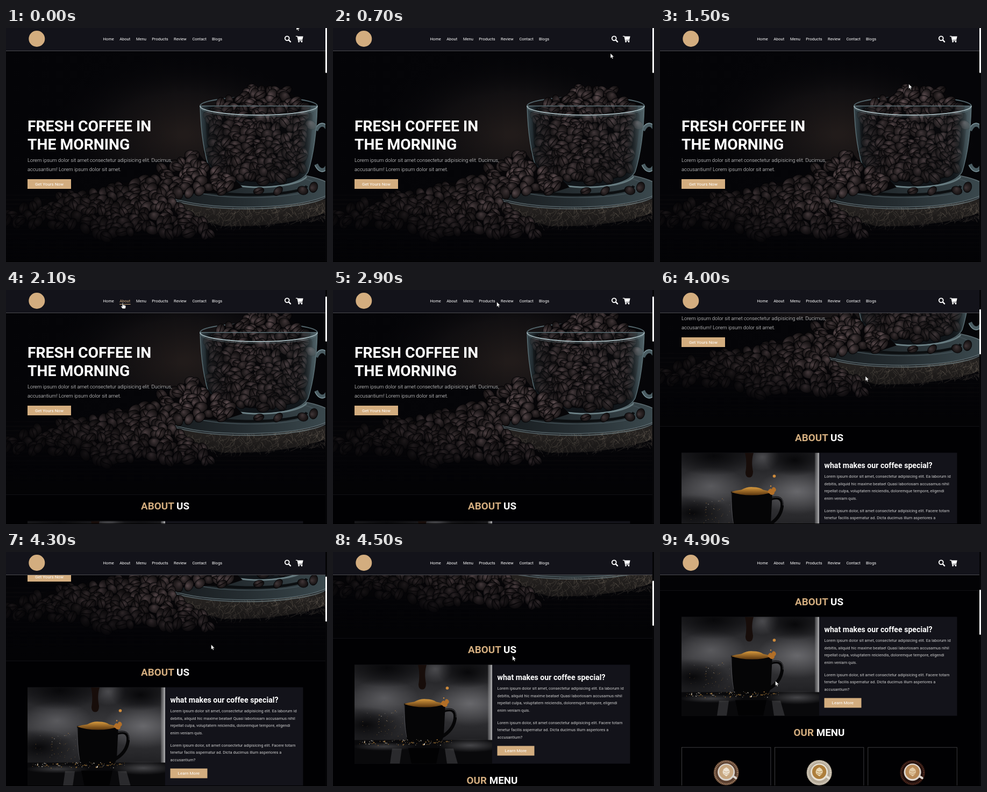
Animation of 597x435 px, one loop 5000 ms. Source, as an HTML page with a canvas:

```html
<!DOCTYPE html>
<html lang="en">
<head>
<meta charset="utf-8">
<title>Coffee shop page</title>
<style>
  html, body { margin: 0; width: 100%; height: 100%; overflow: hidden; background: #010103; }
  #stage { position: relative; width: 597px; height: 435px; overflow: hidden; background: #010103; }
  #page { position: absolute; left: 0; top: 0; width: 594px; height: 900px; will-change: transform; }
  #page > *, #top { position: absolute; left: 0; top: 0; }
  text { font-family: Roboto, Arial, sans-serif; fill: #fff; white-space: pre; }
  .hero { font-size: 28.3px; font-weight: 700; }
  .lead { font-size: 9.43px; font-weight: 300; fill: #eee; }
  .btn { font-size: 8px; }
  .title { font-size: 18.86px; font-weight: 700; text-anchor: middle; }
  .title tspan { fill: #d3ad7f; }
  .sub { font-size: 14.15px; font-weight: 700; }
  .copy { font-size: 7.54px; fill: #ccc; }
  .nav { font-size: 7.54px; }
  .card { fill: none; stroke: #4b4b4e; stroke-width: .8; }
</style>
</head>
<body>
<div id="stage">
  <div id="page">
    <canvas id="photo" width="594" height="446"></canvas>
    <svg id="doc" width="594" height="900">
      <defs>
        <linearGradient id="haze" x1="0" y1="0" x2="0" y2="1">
          <stop offset="0" stop-color="#1b1b1e"/><stop offset=".4" stop-color="#3a3a3d"/>
          <stop offset=".72" stop-color="#242427"/><stop offset="1" stop-color="#0b0b0d"/>
        </linearGradient>
        <radialGradient id="glow">
          <stop offset="0" stop-color="#77777b"/><stop offset="1" stop-color="#77777b" stop-opacity="0"/>
        </radialGradient>
        <radialGradient id="dark">
          <stop offset="0" stop-color="#08080a"/><stop offset="1" stop-color="#08080a" stop-opacity="0"/>
        </radialGradient>
        <linearGradient id="edge">
          <stop offset="0" stop-color="#8b8b8d" stop-opacity=".3"/><stop offset="1" stop-color="#b4b4b6"/>
        </linearGradient>
        <linearGradient id="gold" x1="0" y1="0" x2="0" y2="1">
          <stop offset="0" stop-color="#d79a3f"/><stop offset="1" stop-color="#5b360f"/>
        </linearGradient>
        <clipPath id="frame"><rect width="256" height="184"/></clipPath>
      </defs>

      <path d="M0 446.5H594" stroke="#111115"/>
      <text class="hero" x="40" y="192.2">FRESH COFFEE IN</text>
      <text class="hero" x="40" y="225.8">THE MORNING</text>
      <text class="lead" x="40" y="249.3">Lorem ipsum dolor sit amet consectetur adipisicing elit. Ducimus,</text>
      <text class="lead" x="40" y="266.3">accusantium! Lorem ipsum dolor sit amet.</text>
      <rect x="40" y="281" width="81" height="18" fill="#d3ad7f"/>
      <text class="btn" x="54" y="292.8">Get Yours Now</text>

      <text class="title" x="296" y="473.8"><tspan>ABOUT</tspan> US</text>
      <rect x="40" y="495.5" width="512.5" height="184" fill="#13131a"/>
      <g transform="translate(40 495.5)" clip-path="url(#frame)">
        <rect width="256" height="184" fill="url(#haze)"/>
        <ellipse cx="215" cy="72" rx="75" ry="42" fill="url(#glow)" opacity=".75"/>
        <ellipse cx="55" cy="62" rx="65" ry="36" fill="url(#glow)" opacity=".55"/>
        <ellipse cx="150" cy="8" rx="32" ry="26" fill="url(#glow)" opacity=".5"/>
        <ellipse cx="60" cy="6" rx="80" ry="36" fill="url(#dark)"/>
        <ellipse cx="210" cy="14" rx="55" ry="30" fill="url(#dark)"/>
        <ellipse cx="20" cy="112" rx="70" ry="34" fill="url(#dark)"/>
        <rect x="248" width="8" height="150" fill="url(#edge)"/>
        <rect y="140" width="256" height="44" fill="#09090b"/>
        <ellipse cx="215" cy="150" rx="60" ry="13" fill="url(#glow)" opacity=".55"/>
        <ellipse cx="55" cy="152" rx="60" ry="8" fill="url(#glow)" opacity=".45"/>
        <path d="M100 155h58l-6 29h-46z" fill="#020203"/>
        <path d="M70 156l-4 28h18l4-28zM168 156l4 28h20l-8-28z" fill="#77777b" opacity=".3"/>
        <path d="M118 0h16c-4 14-3 24-1 35q0 11-7 11t-7-9c2-13 2-24-1-37z" fill="#170d0a"/>
        <path d="M165 86q24-8 22 14-3 22-25 34" fill="none" stroke="#050506" stroke-width="6"/>
        <path d="M167 84q23-6 22 14" fill="none" stroke="#5f5f64" stroke-width=".8"/>
        <path d="M92 72h77l-3 60q-2 12-14 13h-43q-11-1-13-13z" fill="#050506"/>
        <path d="M93 75q-1 33 4 60" fill="none" stroke="#55555a" stroke-width=".8"/>
        <path d="M92 73q9-3 19-4 11-6 22-5 12 0 19 5 10 2 17 4-15 6-38 6t-39-6z" fill="url(#gold)"/>
        <path d="M160 73q4-9 8-5 1-6 6-3 4 5-1 8 0 7-7 5z" fill="#b26f27"/>
        <g fill="#cf8b3b"><circle cx="172.500" cy="43.500" r="2.800"/><circle cx="166" cy="62" r="1.200"/></g>
        <g id="sparks"></g>
      </g>
      <text class="sub" x="305.500" y="524.300">what makes our coffee special?</text>
      <g id="copy"></g>
      <rect x="305.500" y="646.500" width="69" height="18" fill="#d3ad7f"/>
      <text class="btn" x="319.600" y="658.300">Learn More</text>

      <text class="title" x="296" y="716.700"><tspan>OUR</tspan> MENU</text>
      <g id="cards"></g>
    </svg>
  </div>

  <svg id="top" width="597" height="435">
    <rect width="594" height="42" fill="#13131a"/>
    <path d="M0 42.500H594" stroke="#4c4c51"/>
    <circle cx="57.300" cy="20" r="15" fill="#d3ad7f"/>
    <g id="nav"></g>
    <circle cx="522.800" cy="19.300" r="3.900" fill="none" stroke="#fff" stroke-width="1.900"/>
    <path d="M525.900 22.400l3.200 3.200" stroke="#fff" stroke-width="2.300" stroke-linecap="round"/>
    <path d="M539.500 15.300h2.500l1.900 8.200h7" fill="none" stroke="#fff" stroke-width="1.300" stroke-linecap="round" stroke-linejoin="round"/>
    <path d="M542.500 15.500h10.200l-1.500 6.600h-7.200z" fill="#fff"/>
    <circle cx="544.600" cy="25.400" r="1.300" fill="#fff"/>
    <circle cx="550" cy="25.400" r="1.300" fill="#fff"/>
    <rect x="594" width="3" height="435" fill="#050507"/>
    <rect id="thumb" x="594" width="3" height="83.500" rx="1" fill="#fff"/>
    <rect y="434" width="597" height="1" fill="#000"/>
    <g id="cursor">
      <path id="arrow" d="M0 0V9.300L2.100 7.400 3.500 10.500 5 9.800 3.700 6.800H6.600Z" fill="#fff" stroke="#111" stroke-width=".6"/>
      <path id="hand" d="M-.9 .7Q0-.6 .9 .7V4Q2 3.300 2.700 4.300 3.800 3.700 4.400 4.800 5.700 4.500 5.800 5.700V8L4.900 10.800H-.3L-3.200 6.800Q-3.200 5.400-1.900 5.800L-.9 6.800Z" fill="#fff" stroke="#111" stroke-width=".6"/>
    </g>
  </svg>
</div>

<script>
const $ = id => document.getElementById(id);

function add(parent, tag, attrs, label) {
  const el = document.createElementNS("http://www.w3.org/2000/svg", tag);
  for (const key in attrs) el.setAttribute(key, attrs[key]);
  if (label) el.textContent = label;
  return parent.appendChild(el);
}

function random(seed) {
  return () => {
    seed = (seed * 1664525 + 1013904223) >>> 0;
    return seed / 4294967296;
  };
}

// ---- hero photo ----
const ctx = $("photo").getContext("2d");
const rnd = random(41);

function fade(grad, stops) {
  stops.forEach(([at, color]) => grad.addColorStop(at, color));
  return grad;
}

function wash(fill) {
  ctx.fillStyle = fill;
  ctx.fillRect(0, 0, 594, 446);
}

function ring(x, y, rx, ry, color, width, from = 0, to = 7) {
  ctx.beginPath();
  ctx.ellipse(x, y, rx, ry, 0, from, Math.min(to, from + Math.PI * 2));
  ctx.strokeStyle = color;
  ctx.lineWidth = width;
  ctx.stroke();
}

function bean(x, y, size, light) {
  const turn = (rnd() - .5) * 2.8, w = size, h = size * (.64 + rnd() * .14);
  const tone = l => `hsl(350 9% ${l}%)`;
  ctx.save();
  ctx.translate(x, y);
  ctx.rotate(turn);
  const shine = ctx.createRadialGradient(-w * .2, -h * .4, 0, 0, 0, w);
  ctx.fillStyle = fade(shine, [[0, tone(light)], [.45, tone(light * .62)], [1, tone(light * .22)]]);
  ctx.strokeStyle = "rgba(3,3,5,.8)";
  ctx.lineWidth = 1;
  ctx.beginPath();
  ctx.ellipse(0, 0, w, h, 0, 0, 7);
  ctx.fill();
  ctx.stroke();
  if (rnd() < .6) {
    const bend = (rnd() - .3) * h;
    ctx.beginPath();
    ctx.moveTo(-w * .9, 0);
    ctx.bezierCurveTo(-w * .3, bend, w * .3, -bend, w * .9, 0);
    ctx.strokeStyle = "#0a0708";
    ctx.lineWidth = 1.4;
    ctx.stroke();
  }
  ctx.restore();
}

function heap(outline, size, lightAt) {
  const area = new Path2D(outline);
  ctx.fillStyle = "#070608";
  ctx.fill(area);
  for (let y = 90; y < 400; y += size * .82)
    for (let x = 0; x < 594; x += size * 1.4) {
      const px = x + (rnd() - .5) * size * 1.3, py = y + (rnd() - .5) * size * .8;
      if (ctx.isPointInPath(area, px, py))
        bean(px, py, size * (.85 + rnd() * .3), lightAt(px, py) * (.75 + rnd() * .5));
    }
}

function burlap() {
  const cloth = new Path2D("M318 322Q420 352 594 318V344Q510 372 400 368L340 350Z");
  ctx.fillStyle = "#24211f";
  ctx.fill(cloth);
  for (let i = 0; i < 330; i++) {
    const x = 325 + rnd() * 269, y = 349 + (rnd() - .5) * 34 - Math.max(0, x - 460) * .1;
    ctx.beginPath();
    ctx.moveTo(x, y);
    ctx.quadraticCurveTo(x + 4, y + 4, x + (rnd() - .6) * 22, y + 4 + rnd() * 9);
    ctx.strokeStyle = `rgba(${rnd() < .5 ? "122,112,100" : "62,57,54"},.5)`;
    ctx.lineWidth = .8;
    ctx.stroke();
  }
}

function saucer() {
  ctx.beginPath();
  ctx.ellipse(447, 299, 160, 34, 0, 0, 7);
  ctx.fillStyle = fade(ctx.createLinearGradient(290, 0, 594, 0),
    [[0, "#15191c"], [.5, "#252d31"], [1, "#3a484d"]]);
  ctx.fill();
  ring(447, 299, 160, 34, "#5c6b70", 1.5);
  ring(447, 303, 158, 33, "rgba(125,145,150,.55)", 2.5, .3, 2.9);
  ring(455, 293, 122, 22, "#46545a", 1.2);
  ring(455, 292, 105, 18, "#0c0f11", 5, .1, 3);
}

function cup() {
  const glass = new Path2D("M361 145Q363 220 380 267Q392 294 470 296Q548 294 562 267Q577 220 579 145Z");
  ring(588, 222, 17, 42, "#4a5c62", 7, -2.3, 2.3);
  ring(588, 222, 20, 45, "#8199a0", 1.3, -2.3, 2.3);
  ctx.fillStyle = "#11161a";
  ctx.fill(glass);
  ring(470, 145, 109, 17, "#52646a", 2, Math.PI, Math.PI * 2);
  heap("M371 160Q392 148 402 135Q430 130 446 116Q484 99 525 117Q540 130 556 138L570 162Q570 224 552 262Q540 284 470 286Q400 284 384 262Q372 222 371 160Z",
    11, (x, y) => 30 - Math.abs(x - 470) * .05 - Math.max(0, y - 170) * .05);
  ctx.fillStyle = fade(ctx.createLinearGradient(361, 0, 579, 0), [
    [0, "rgba(120,150,160,.38)"], [.08, "rgba(20,28,32,.35)"], [.3, "rgba(10,10,14,.08)"],
    [.85, "rgba(20,28,32,.2)"], [.95, "rgba(130,160,168,.4)"], [1, "rgba(150,180,188,.5)"]]);
  ctx.fill(glass);
  ctx.strokeStyle = "#5d7278";
  ctx.lineWidth = 1.3;
  ctx.stroke(glass);
  ring(470, 145, 109, 17, "#9fb2b7", 2, 0, Math.PI);
  ring(470, 149, 107, 16, "rgba(120,145,152,.5)", 1.2, 0, Math.PI);
  ring(471, 270, 91, 26, "rgba(135,160,166,.6)", 3, .25, 2.9);
}

function photo() {
  wash("#050508");
  ctx.save();
  ctx.scale(1, .55);
  wash(fade(ctx.createRadialGradient(330, 360, 10, 330, 360, 270),
    [[0, "#211b1a"], [.5, "#121012"], [1, "rgba(5,5,8,0)"]]));
  ctx.restore();
  for (let i = 0; i < 16; i++) {
    ctx.fillStyle = "rgba(70,58,54,.09)";
    ctx.fillRect(0, 310 + i * 8, 594, 1 + rnd() * 2);
  }
  burlap();
  saucer();
  cup();
  heap("M0 338L60 322 130 306 200 293 262 278 300 255 335 238 358 232 378 258 420 276 440 296 410 306 335 308 306 320 340 345 392 372 382 386 300 384 250 376 190 392 150 374 60 368 0 362Z",
    11.500, x => 15 + Math.min(14, x * .04));
  [[470, 303], [506, 303], [572, 296], [552, 302]].forEach(([x, y]) => bean(x, y, 10, 24));
  wash(fade(ctx.createLinearGradient(0, 0, 330, 0), [[0, "rgba(3,3,6,.5)"], [1, "rgba(3,3,6,0)"]]));
  wash(fade(ctx.createLinearGradient(0, 335, 0, 438), [[0, "rgba(2,2,5,0)"], [.6, "rgba(2,2,5,.68)"], [1, "#030305"]]));
}
photo();

// ---- page parts ----
for (let i = 0; i < 150; i++) {
  const low = i < 100;
  const x = low ? rnd() * 185 : 15 + rnd() * 75;
  const y = low ? 144 + (rnd() + rnd() - 1) * 7 : 85 + rnd() * 48;
  add($("sparks"), "circle", { cx: x, cy: y, r: .3 + rnd() * (low ? 1 : .4),
    fill: rnd() < .65 ? "#b98640" : "#d8cfc0", opacity: .35 + rnd() * .6 });
}

[
  ["Lorem ipsum dolor sit amet, consectetur adipisicing elit. Ea laborum id",
   "debitis, aliquid hic maxime beatae! Quasi laboriosam accusamus nihil",
   "repellat culpa, voluptatem reiciendis, doloremque tempore, eligendi",
   "enim veniam quis."],
  ["Lorem ipsum dolor, sit amet consectetur adipisicing elit. Facere totam",
   "tenetur facilis aspernatur ad. Dicta ducimus illum asperiores a",
   "accusantium?"]
].forEach((lines, p) => lines.forEach((line, i) =>
  add($("copy"), "text", { class: "copy", x: 305.5, y: 542.1 + p * 63.5 + i * 13.57 }, line)));

[
  { x: 40.4, plate: "#5b4030", rim: "#a58468", dish: "#d8d2cb", milk: "#c7a67f", foam: "#eee3d3" },
  { x: 213.4, plate: "#b5aa98", rim: "#d9d2c5", dish: "#e8e2d6", milk: "#ad7e3c", foam: "#ead9b5" },
  { x: 386.8, plate: "#23110e", rim: "#5a3023", dish: "#ded7cf", milk: "#b98a58", foam: "#e2c9a4" }
].forEach(({ x, plate, rim, dish, milk, foam }) => {
  const g = add($("cards"), "g", { transform: `translate(${x} 738.2)` });
  const disc = (cx, cy, r, fill, more) => add(g, "circle", { cx, cy, r, fill, ...more });
  add(g, "rect", { class: "card", width: 165.5, height: 160 });
  disc(82.8, 47, 23.5, plate);
  disc(82.8, 47, 21, "none", { stroke: rim, "stroke-width": 3, "stroke-dasharray": "1.5 1.5" });
  add(g, "path", { d: "M93 52l8 5", stroke: dish, "stroke-width": 4, "stroke-linecap": "round" });
  disc(82.8, 46, 16, dish);
  disc(82.8, 45.500, 13.200, milk);
  add(g, "path", { d: "M83 37q9 5 5 12l-5 5-6-5q-3-8 6-12z", fill: foam });
  add(g, "path", { d: "M78 44q5 4 10 0M78 48q5 4 10 0", fill: "none", stroke: milk });
});

const links = [
  ["Home", 180.5, 20.5], ["About", 211.2, 20.5], ["Menu", 242, 19], ["Products", 271.3, 30.5],
  ["Review", 312, 24], ["Contact", 346.4, 26.5], ["Blogs", 383.1, 19.3]
].map(([name, x, w]) => ({
  x, w,
  label: add($("nav"), "text", { class: "nav", x, y: 23.1 }, name),
  line: add($("nav"), "path", { d: `M${x} 26.500h${w}`, stroke: "#d3ad7f" })
}));

// ---- motion: time, then values ----
const scrollKeys = [
  [0, 0], [1500, 0], [1600, 18], [1700, 50], [1800, 66], [3700, 66], [3800, 98],
  [3900, 150], [4000, 193], [4150, 225], [4300, 244], [4600, 307], [4900, 375]
];
const cursorKeys = [
  [0, 540, -5], [500, 532, 22], [900, 500, 72], [1300, 463, 104], [1800, 462, 104],
  [1950, 330, 55], [2100, 217, 24], [2300, 222, 23], [2550, 251, 22], [2800, 286, 22],
  [3000, 323, 22], [3200, 359, 22], [3400, 391, 23], [3550, 382, 85], [3700, 375, 143],
  [4000, 382, 160], [4300, 381.5, 172], [4600, 310, 203], [4900, 214.5, 239.5]
];

function at(keys, t) {
  let i = 1;
  while (i < keys.length - 1 && keys[i][0] < t) i++;
  const a = keys[i - 1], b = keys[i];
  const k = Math.min(1, (t - a[0]) / (b[0] - a[0]));
  return a.slice(1).map((v, n) => v + (b[n + 1] - v) * k);
}

function draw(t) {
  const scroll = Math.round(at(scrollKeys, t)[0]);
  const [x, y] = at(cursorKeys, t);
  $("page").style.transform = `translateY(${-scroll}px)`;
  $("thumb").setAttribute("y", scroll * .187);
  let over = false;
  for (const link of links) {
    const on = x >= link.x && x <= link.x + link.w && y > 14 && y < 28;
    link.label.style.fill = on ? "#d3ad7f" : "#fff";
    link.line.style.display = on ? "" : "none";
    over = over || on;
  }
  $("arrow").style.display = over ? "none" : "";
  $("hand").style.display = over ? "" : "none";
  $("cursor").setAttribute("transform", `translate(${x} ${y})`);
}

const start = performance.now();
function tick() {
  const t = (performance.now() - start) % 5000;
  draw(Math.floor(t / 100) * 100);
  requestAnimationFrame(tick);
}
tick();
</script>
</body>
</html>
```
